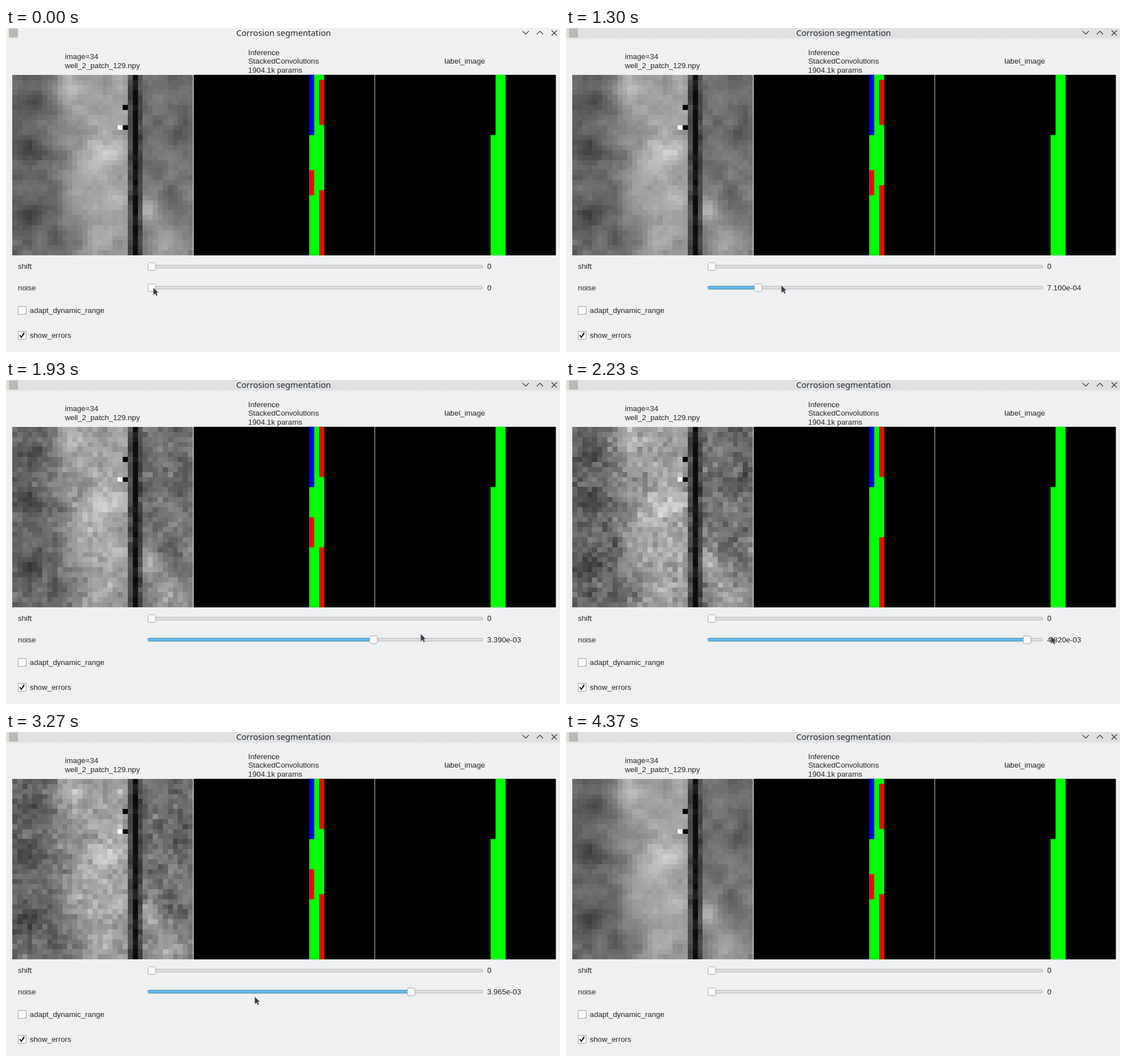
An HTML page with a canvas for the animation above (4610 ms loop, 978x573 px).

```html
<!DOCTYPE html>
<html lang="en">
<head>
<meta charset="utf-8">
<title>Corrosion segmentation</title>
<style>
  html, body { margin: 0; width: 978px; height: 573px; overflow: hidden; background: #eff0f1; }
  body { position: relative; }
  canvas { position: absolute; left: 11px; top: 83px; width: 319px; height: 319px; image-rendering: pixelated; }
  svg { position: absolute; left: 0; top: 0; }
  text { font: 13.3px "Liberation Sans", Arial, sans-serif; fill: #232629; white-space: pre; }
  #caption { font: 14.67px "Noto Sans", sans-serif; text-anchor: middle; }
  .groove { fill: #dcdee0; stroke: #b3b5b8; }
  .knob, .box { fill: #fcfcfc; stroke: #a2a5a8; }
  .line { fill: none; stroke: #31363b; stroke-width: 1.2; }
</style>
</head>
<body>
<canvas id="scan" width="36" height="36"></canvas>

<svg width="978" height="573" viewBox="0 0 978 573">
  <defs>
    <linearGradient id="bar" x2="0" y2="1">
      <stop offset="0.78" stop-color="#dee0e2"/>
      <stop offset="0.82" stop-color="#ecedef"/>
      <stop offset="1" stop-color="#eff0f1"/>
    </linearGradient>
  </defs>
  <rect id="active" width="978" height="23" fill="url(#bar)"/>
  <rect x="5" y="1" width="16" height="16" fill="#bdb7b0"/>
  <text id="caption" x="490" y="14">Corrosion segmentation</text>
  <path class="line" d="M912 5.5l5.5 5.5 5.5-5.5M937 11l5.5-5.5 5.5 5.5M963 4l9.5 9.5m0-9.5l-9.5 9.5"/>

  <text x="104" y="55">image=34</text>
  <text x="104" y="71">well_2_patch_129.npy</text>
  <text x="427.5" y="47.5">Inference</text>
  <text x="427.5" y="63">StackedConvolutions</text>
  <text x="427.5" y="78.5">1904.1k params</text>
  <text x="774" y="63">label_image</text>

  <!-- Both masks use cells of the 36 by 36 grid as units. -->
  <g transform="translate(331.2 82.8) scale(8.87)">
    <rect width="36" height="36"/>
    <path fill="#0f0" d="M23 12h1V0h2V36h-3Z"/>
    <path fill="#00f" d="M23 0h1V12h-1Z"/>
    <path id="errors" fill="#f00"/>
  </g>
  <g transform="translate(651.4 82.8) scale(8.87)">
    <rect width="36" height="36"/>
    <path fill="#0f0" d="M23 12h1V0h2V36h-3Z"/>
  </g>

  <text x="21" y="426">shift</text>
  <rect class="groove" x="250.5" y="419.5" width="591" height="5" rx="2.5"/>
  <rect class="knob" x="250.5" y="415" width="13.5" height="13.5" rx="2.5"/>
  <text x="849.5" y="426">0</text>

  <text x="21" y="464">noise</text>
  <rect class="groove" x="250.5" y="456.8" width="591" height="5" rx="2.5"/>
  <rect id="fill" x="250.5" y="456.8" height="5" rx="2.5" fill="#62bdf0" stroke="#3b87b0"/>
  <rect id="knob" class="knob" y="452.6" width="13.5" height="13.5" rx="2.5"/>
  <text id="value" x="849.5" y="464">0</text>

  <rect class="box" x="21.5" y="492.5" width="14" height="14"/>
  <text x="42" y="504">adapt_dynamic_range</text>
  <rect class="box" x="21.5" y="536.5" width="14" height="14"/>
  <path d="M24.3 543.5l3 3.5 5-8" fill="none" stroke="#111" stroke-width="2.2"/>
  <text x="42" y="548">show_errors</text>

  <path id="cursor" d="M0 0L9.2 9 5.8 9.6 7.8 14 5.3 15 3.3 10.8 0 13.5Z"
    fill="#3a3d41" stroke="#e4e5e6" stroke-width="0.6"/>
</svg>

<script>
const LOOP = 4610, N = 36, RATE = 0.03;
const $ = id => document.getElementById(id);
const mix = (a, b, u) => a + (b - a) * u;

// Pointer moves: start, end, then x, y and noise level (thousandths) reached.
// Everything rests between them.
const home = [260, 459, 0];
const moves = [
  [730, 830, 269, 459, 0.01],
  [1130, 1630, 595, 446, 2.075],
  [1670, 2130, 838, 452, 4.4],
  [2200, 2230, 856, 453, 4.82],
  [2230, 2370, 964, 462, 5],
  [2370, 2470, 895, 471, 5],
  [2930, 3270, 425, 468, 3.935],
  [3470, 3700, 215, 410, 0],
  [3700, 3970, 57, 35, 0],
  [4070, 4230, -10, -30, 0]];

function poseAt(t) {
  let pose = home, seed = 0;
  for (const [start, end, ...goal] of moves) {
    if (t < start) break;
    seed = Math.min(t, end);
    const u = (seed - start) / (end - start);
    pose = pose.map((v, i) => mix(v, goal[i], u));
  }
  return [...pose, seed];
}

function hash(x, y, s) {
  let h = Math.imul(x, 374761393) ^ Math.imul(y, 668265263) ^ Math.imul(s, 974634777);
  h = Math.imul(h ^ h >>> 13, 1274126177);
  h = Math.imul(h ^ h >>> 15, 2246822519);
  return ((h ^ h >>> 16) >>> 0) / 4294967296;
}

function smooth(x, y, s) {
  const i = Math.floor(x), j = Math.floor(y);
  const ease = u => u * u * (3 - 2 * u), u = ease(x - i), v = ease(y - j);
  return mix(mix(hash(i, j, s), hash(i + 1, j, s), u),
    mix(hash(i, j + 1, s), hash(i + 1, j + 1, s), u), v) - 0.5;
}

// Main spots of the scan: column, row, brightness.
const spots = [
  [3, 5, -36], [3, 14.5, -34], [2.5, 28, -48], [33, 11.5, -40], [31, 24, -30],
  [18, 15, 48], [15.5, 18, 30], [20, 23.5, 28], [11.5, 23, 26], [11, 2.5, 24],
  [27, 26.5, 52], [30.5, 33, 42]];

function tone(c, r) {
  if (c === 22 && (r === 6 || r === 10)) return 0;
  if (c === 21 && r === 10) return 250;
  if (c === 24) return 12 + 60 * Math.max(0, smooth(0, r / 1.5, 5));
  if (c === 23 || c === 25) return 74 + 40 * smooth(c, r / 2, 6);
  let g = c > 25 ? 112 + r * 0.4
    : 102 + 58 / (1 + Math.exp((8 + r * 0.13 - c) / 1.5));
  for (const [x, y, amp] of spots)
    g += amp * Math.exp(-((c - x) ** 2 + (r - y) ** 2) / 7);
  return g + 34 * smooth(c / 2.6, r / 2.2, 3) + 10 * (hash(c, r, 4) - 0.5);
}

const base = Array.from({ length: N * N }, (_, i) => tone(i % N, Math.floor(i / N)));
const scan = $('scan').getContext('2d');
const pixels = scan.createImageData(N, N);

function drawScan(level, seed) {
  base.forEach((g, i) => {
    const bell = hash(i, 1, seed) + hash(i, 2, seed) + hash(i, 3, seed) - 1.5;
    const v = g + bell * level * 5.4 * Math.min(1, g / 100);
    pixels.data.set([v, v, v, 255], i * 4);
  });
  scan.putImageData(pixels, 0, 0);
}

// More noise shifts the ends of the wrongly marked runs.
function drawErrors(level) {
  const run = (col, from, to) => `M${col} ${from}h1V${to}h-1Z`;
  const full = level === 5, wobble = Math.round(1.4 * Math.sin(1.5 * level));
  const leftEnd = full ? 26 : level > 4.5 ? 18 : 24;
  $('errors').setAttribute('d',
    run(25, level > 2.5 ? 0 : 1, 10) +
    (full ? run(25, 25, 29) : run(25, 23 - wobble, 36)) +
    run(23, level > 1 ? 18 : 19, leftEnd));
}

function show(t) {
  const [x, y, raw, seed] = poseAt(t);
  const level = Math.round(raw * 200) / 200;
  const pos = 577.5 * level / 5;
  $('active').style.display = t >= 430 && t < 4370 ? '' : 'none';
  $('cursor').setAttribute('transform', `translate(${Math.round(x)} ${Math.round(y)})`);
  $('knob').setAttribute('x', 250.5 + pos);
  $('fill').setAttribute('width', pos + 7);
  $('fill').style.display = level ? '' : 'none';
  $('value').textContent = level
    ? (level / 1000).toExponential(3).replace(/-(\d)$/, '-0$1') : '0';
  drawScan(level, seed);
  drawErrors(level);
}

let shown = -1;
function frame() {
  const now = performance.now() % LOOP;
  const tick = Math.floor((now + 4) * RATE);
  if (tick !== shown) {
    shown = tick;
    show(Math.floor(tick / RATE / 10) * 10);
  }
  requestAnimationFrame(frame);
}
frame();
</script>
</body>
</html>
```
